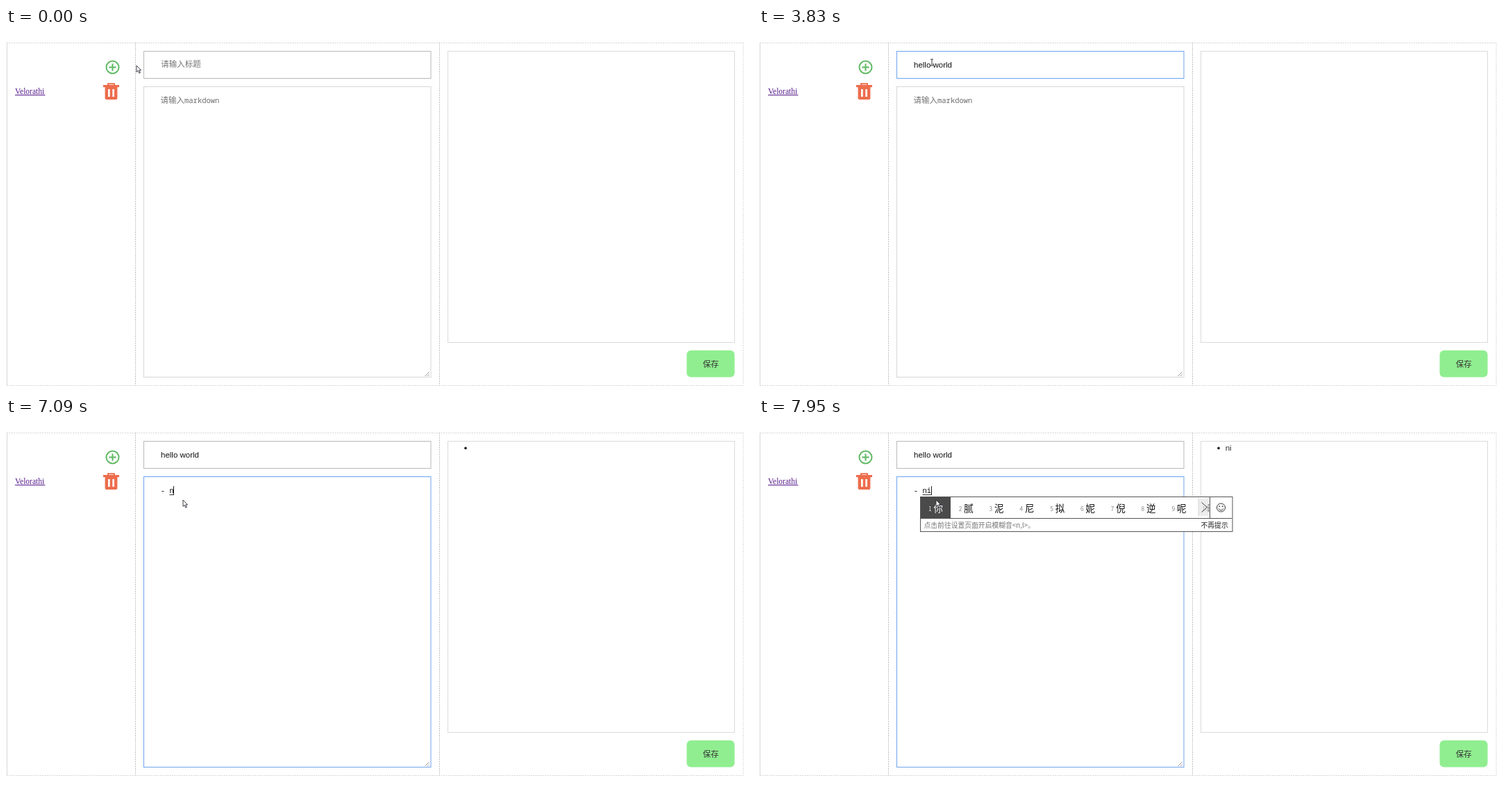
An HTML page with a canvas for the animation above (8000 ms loop, 1076 by 521 pixels).

```html
<!DOCTYPE html>
<html lang="zh-CN">
<head>
<meta charset="utf-8">
<title>Markdown editor</title>
<style>
html, body { margin: 0; width: 100%; height: 100%; overflow: hidden; background: #fff; }
canvas { display: block; }
</style>
</head>
<body>
<canvas id="stage" width="1076" height="521"></canvas>
<script>
const ctx = document.getElementById('stage').getContext('2d');
const LOOP = 8000, BLINK = 545;
const CJK = '"Noto Sans CJK SC", "Noto Sans CJK", sans-serif';
const SANS = '11.5px "Liberation Sans", "Noto Sans CJK SC", sans-serif';
const SERIF = '11.5px "Liberation Serif", serif';
const MONO = '10.5px "Noto Sans Mono", monospace';
const cjk = size => `${size}px ${CJK}`;
const BLUE = '#6ea3ee', HINT = '#757575', MONO_STEP = 6.3;

// Each track is a list of [start time, value]; a value holds until the next.
const TITLE = [[0, ''], [1090, 'h'], [1240, 'he'], [1410, 'hel'], [1560, 'hell'],
  [1710, 'hello'], [1880, 'hello '], [2180, 'hello w'], [2260, 'hello wo'],
  [2960, 'hello wor'], [3130, 'hello worl'], [3280, 'hello world']];
const NOTE = [[0, ''], [5380, '-'], [5610, '- ']];
const COMPOSE = [[0, ''], [7090, 'n'], [7330, "n'h"], [7720, 'n'], [7870, 'ni']];
const PREVIEW = [[0, ''], [7170, 'n'], [7410, "n'h"], [7800, 'n'], [7950, 'ni']];
const FOCUS = [[0, ''], [240, 'title'], [4600, 'note']];
const POINTER = [[0, ['arrow', 188, 54]], [80, ['beam', 218, 52]], [160, ['beam', 249, 49.5]],
  [4290, ['beam', 250, 58]], [4370, ['arrow', 253, 76]], [4440, ['beam', 256, 95]],
  [4520, ['beam', 258.5, 106.5]], [7090, ['arrow', 255, 118]]];
const CLICKS = [[240, 320, 249, 50], [4600, 4750, 257.5, 107]];

function step(track, t) {
  let found = track[0];
  for (const item of track) if (item[0] <= t) found = item;
  return found;
}
const at = (track, t) => step(track, t)[1];

function text(str, x, y, font, color) {
  ctx.font = font;
  ctx.fillStyle = color;
  ctx.fillText(str, x, y);
}

function line(color, width, ...pts) {
  ctx.strokeStyle = color;
  ctx.lineWidth = width;
  ctx.beginPath();
  for (let i = 0; i < pts.length; i += 2) ctx.lineTo(pts[i], pts[i + 1]);
  ctx.stroke();
}

function rect(color, x, y, w, h) {
  ctx.fillStyle = color;
  ctx.fillRect(x, y, w, h);
}

function frame(color, x, y, w, h) {
  ctx.strokeStyle = color;
  ctx.lineWidth = 1;
  ctx.strokeRect(x, y, w, h);
}

function disc(color, x, y, r) {
  ctx.fillStyle = color;
  ctx.beginPath();
  ctx.arc(x, y, r, 0, 7);
  ctx.fill();
}

function ring(color, width, x, y, r, from = 0, to = 7) {
  ctx.strokeStyle = color;
  ctx.lineWidth = width;
  ctx.beginPath();
  ctx.arc(x, y, r, from, to);
  ctx.stroke();
}

function columns() {
  ctx.setLineDash([2, 1.4]);
  line('#d4d4d4', 1, 1, 21.5, 1062, 21.5);
  line('#d4d4d4', 1, 1, 514.5, 1062, 514.5);
  for (const x of [186.5, 624.5]) line('#bdbdbd', 1, x, 21, x, 515);
  line('#d4d4d4', 1, 1062, 21, 1062, 515);
  ctx.setLineDash([]);
  line('#d8d8d8', 1, 1.5, 21, 1.5, 515);
}

function sidebar() {
  const green = '#62bb66', red = '#ed6d4d';
  ring(green, 2.1, 153.5, 56.5, 9);
  line(green, 2.1, 148.3, 56.5, 158.7, 56.5);
  line(green, 2.1, 153.5, 51.3, 153.5, 61.7);

  text('Velorathi', 13, 95, SERIF, '#551a8b');
  line('#551a8b', 1, 13, 96.5, 56.4, 96.5);

  line(red, 2, 147, 83, 147, 80.3, 156, 80.3, 156, 83);
  rect(red, 140, 82, 23, 3.2);
  ctx.fillStyle = red;
  ctx.beginPath();
  ctx.roundRect(142.6, 84.5, 17.8, 18.5, [0, 0, 2, 2]);
  ctx.fill();
  rect('#fff', 147, 88, 2.7, 11);
  rect('#fff', 153.3, 88, 2.7, 11);
}

function caret(x, y, t, since) {
  if (Math.floor((t - since) / BLINK) % 2 === 0) line('#222', 1, x, y, x, y + 13);
}

function titleField(t, focus) {
  const [typedAt, title] = step(TITLE, t);
  frame(focus === 'title' ? BLUE : '#b8b8b8', 198.5, 33.5, 413.5, 39);
  if (title) text(title, 223, 56.5, SANS, '#111');
  else text('请输入标题', 223.3, 56.3, cjk(11.5), HINT);
  if (focus === 'title') {
    ctx.font = SANS;
    const x = Math.floor(223 + ctx.measureText(title).width) + 0.5;
    caret(x, 46, t, Math.max(typedAt, 240));
  }
}

function noteField(t, focus) {
  const [noteAt, note] = step(NOTE, t);
  const [composeAt, compose] = step(COMPOSE, t);
  frame(focus === 'note' ? BLUE : '#d6d6d6', 198.5, 84.5, 413.5, 418);
  line('#777', 0.8, 603.5, 501, 609.5, 495);
  line('#777', 0.8, 607, 501, 609.5, 498.5);
  if (!note) {
    text('请输入', 222.5, 108.3, cjk(11.5), HINT);
    text('markdown', 257, 108, MONO, '#6c6c6c');
  } else {
    text(note + compose, 222.8, 108, MONO, '#111');
  }
  const end = 222.8 + (note + compose).length * MONO_STEP;
  if (compose) line('#333', 1, 235.5, 110.5, end, 110.5);
  if (focus === 'note') caret(Math.floor(end) + 0.5, 98, t, Math.max(noteAt, composeAt, 4600));
}

function preview(t) {
  frame('#dadada', 636.5, 33.5, 413, 419);
  if (t >= 5760) {
    disc('#222', 662, 43.3, 1.9);
    text(at(PREVIEW, t), 671.7, 46.7, SANS, '#333');
  } else if (t >= 5460) {
    text('-', 648, 46.7, SANS, '#333');
  }
  ctx.fillStyle = '#90ee90';
  ctx.beginPath();
  ctx.roundRect(980.5, 464, 69, 38.5, 6);
  ctx.fill();
  text('保存', 1003.7, 488, cjk(11.5), '#333');
}

function smile(x, y) {
  ring('#333', 1, x, y, 6);
  ring('#333', 1, x, y + 0.3, 3.4, 0.3, Math.PI - 0.3);
  disc('#333', x - 2.2, y - 1.8, 0.9);
  disc('#333', x + 2.2, y - 1.8, 0.9);
}

function candidates(words, right, hint) {
  const bar = right - 32, arrow = bar - 16.5;
  const height = hint ? 50 : 31;
  rect('#fff', 232, 113, right - 232, height);
  ctx.save();
  ctx.beginPath();
  ctx.rect(232, 113, bar - 232, 32);
  ctx.clip();
  rect('#4a4a4a', 232, 113, 44, 31.5);
  [...words].forEach((word, i) => {
    const x = 244 + i * 43.8;
    text(i + 1, x, 133.5, cjk(8.5), i ? '#888' : '#ddd');
    text(word, x + 7.5, 134.8, cjk(13.5), i ? '#111' : '#fff');
  });
  rect('rgba(222,222,222,.55)', arrow, 115.5, 17, 26);
  line('#ccc', 0.8, arrow, 115.5, arrow, 141.5);
  line('#444', 1, arrow + 4.5, 121.5, arrow + 12.5, 128.5, arrow + 4.5, 135.5);
  ctx.restore();
  line('#555', 1, bar, 113, bar, 144.5);
  smile(right - 16, 129);
  if (hint) {
    line('#555', 1, 232, 144.5, right, 144.5);
    text('点击前往设置页面开启模糊音<n,l>。', 237.5, 157.5, cjk(9.8), '#777');
    text('不再提示', 636.5, 157.5, cjk(9.8), '#222');
  }
  frame('#555', 232.5, 113.5, right - 232, height);
}

function popups(t) {
  if (t >= 320 && t < 1090) {
    rect('#fff', 198, 74, 140, 38);
    frame('#d2d2d2', 198.5, 73.5, 139, 38);
  }
  if (t >= 7950) candidates('你腻泥尼拟妮倪逆呢昵', 681.5, true);
  else if (t >= 7170) candidates('你呢那您年内能', 570.5, false);
}

function pointer(t) {
  const [kind, x, y] = at(POINTER, t);
  if (kind === 'beam') {
    line('#333', 1, x, y - 4.5, x, y + 4.5);
    line('#333', 0.9, x - 2, y - 4.5, x + 2, y - 4.5);
    line('#333', 0.9, x - 2, y + 4.5, x + 2, y + 4.5);
    return;
  }
  const shape = new Path2D('M0 0V9.3L2.2 7.3L3.8 11L5.4 10.3L3.8 6.8H6.6Z');
  ctx.save();
  ctx.translate(x, y);
  ctx.fillStyle = '#fff';
  ctx.fill(shape);
  ctx.strokeStyle = '#2b2b36';
  ctx.lineWidth = 0.9;
  ctx.stroke(shape);
  ctx.restore();
}

function draw(t) {
  const focus = at(FOCUS, t);
  rect('#fff', 0, 0, 1076, 521);
  columns();
  sidebar();
  titleField(t, focus);
  noteField(t, focus);
  preview(t);
  popups(t);
  for (const [from, to, x, y] of CLICKS) {
    if (t >= from && t < to) disc('rgba(255,250,0,.6)', x, y, 8);
  }
  pointer(t);
}

const start = performance.now();
function tick() {
  draw((performance.now() - start) % LOOP);
  requestAnimationFrame(tick);
}
tick();
</script>
</body>
</html>
```
